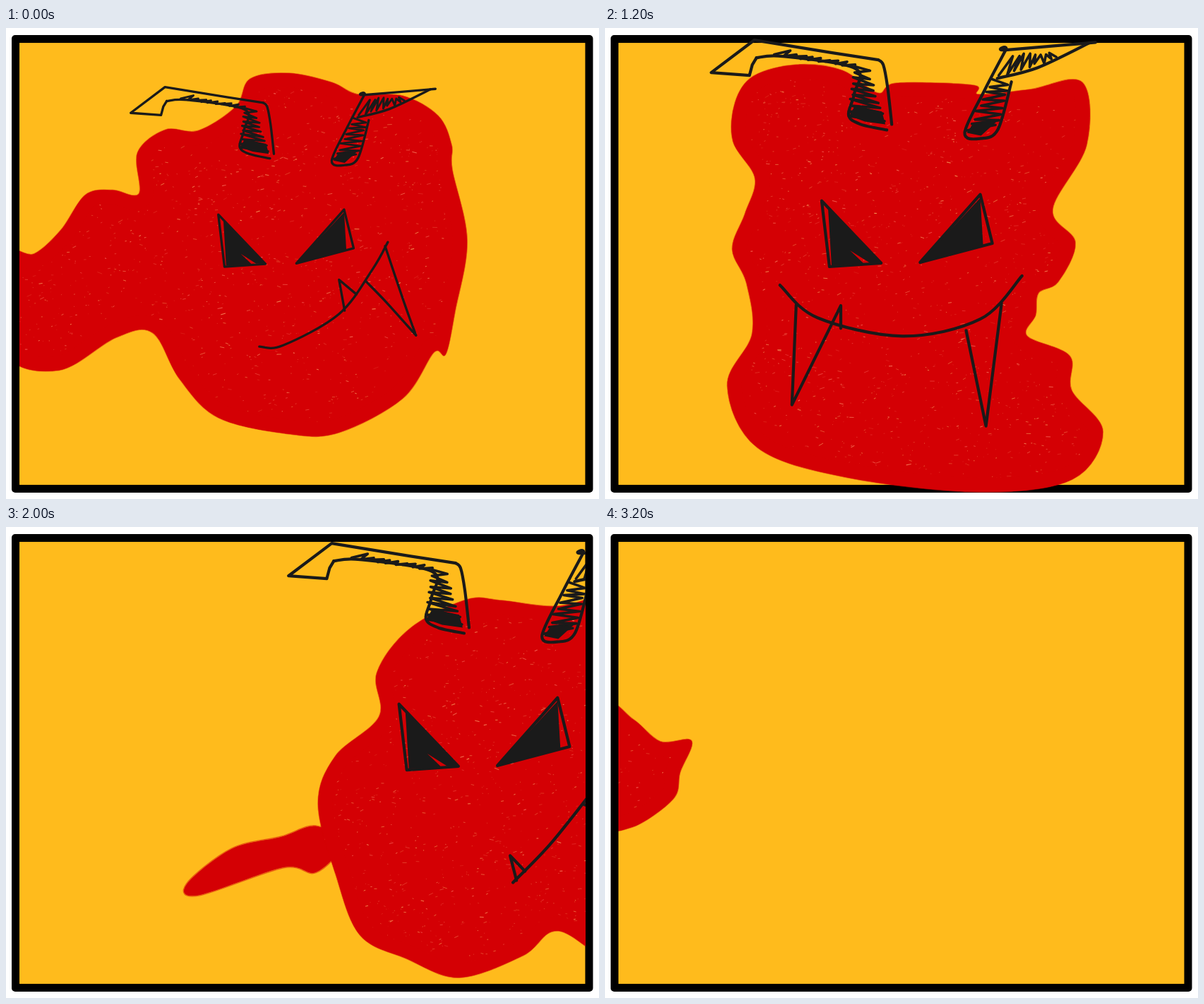
Write an HTML page with a canvas that moves like this. It is 840 px wide and 667 px high and loops after 3600 ms.

```html
<!DOCTYPE html>
<html lang="en">
<head>
<meta charset="utf-8">
<title>Red devil</title>
<style>
html, body { margin: 0; width: 100%; height: 100%; overflow: hidden; background: #fff; }
canvas { display: block; }
</style>
</head>
<body>
<canvas id="stage" width="840" height="667"></canvas>
<script>
const ctx = document.getElementById('stage').getContext('2d');
const RED = '#d40004', INK = '#1a1a1a', YELLOW = '#ffbb1c';
const HOLD = 400, ZOOM = 1.003;

const pts = s => s.split(' ').map(p => p.split(',').map(Number));
const lerp = (a, b, k) => a + (b - a) * k;

function random(seed) {
  return () => {
    seed = (seed * 1664525 + 1013904223) >>> 0;
    return seed / 4294967296;
  };
}

// Smooth path through a few key points
function curve(s, closed) {
  const p = pts(s), n = p.length, path = new Path2D();
  const at = i => closed ? p[(i + n) % n] : p[Math.max(0, Math.min(n - 1, i))];
  path.moveTo(...p[0]);
  for (let i = 0; i < (closed ? n : n - 1); i++) {
    const [a, b, c, d] = [at(i - 1), at(i), at(i + 1), at(i + 2)];
    path.bezierCurveTo(b[0] + (c[0] - a[0]) / 6, b[1] + (c[1] - a[1]) / 6,
      c[0] - (d[0] - b[0]) / 6, c[1] - (d[1] - b[1]) / 6, c[0], c[1]);
  }
  if (closed) path.closePath();
  return path;
}

function poly(s, closed) {
  const path = new Path2D();
  pts(s).forEach(p => path.lineTo(...p));
  if (closed) path.closePath();
  return path;
}

// Uneven scribble bouncing between two edges
function scribble(edgeA, edgeB, n) {
  const path = new Path2D(), a = pts(edgeA), b = pts(edgeB), rnd = random(n);
  for (let i = 0; i <= 2 * n; i++) {
    const [u, v] = i % 2 ? b : a, k = i / (2 * n);
    path.lineTo(lerp(u[0], v[0], k) + rnd() * 4 - 2, lerp(u[1], v[1], k) + rnd() * 4 - 2);
  }
  return path;
}

const leftHorn = [
  poly('345,87 280,77 170,59 109,105 163,109 167,94 173,84'),
  curve('345,87 352,94 358,125 364,178'),
  curve('173,84 210,82 312,99 311,135 303,165 320,178 357,186')
];
const rightHorn = [
  curve('643,63 643,63 525,73 525,73 495,130 467,190 490,198 514,185 533,118'),
  curve('513,113 570,98 643,63')
];
const eyes = [
  poly('265,286 276,379 349,374', true),
  poly('489,277 506,346 404,373', true)
];
const hatches = [
  scribble('199,81 308,95', '213,75 318,93', 9),
  scribble('313,98 304,166', '330,100 355,176', 9),
  scribble('516,111 598,84', '532,80 592,78', 8),
  scribble('506,116 471,188', '530,116 511,184', 8)
];
const fills = [
  poly('304,166 312,152 350,160 355,178 326,174', true),
  poly('470,190 478,178 512,174 490,194', true),
  poly('274,296 279,377 326,376 305,356 332,373 349,373', true),
  poly('489,282 493,349 404,373', true)
];

const smirk = [
  curve('338,521 380,519 480,463 540,383 567,335'),
  poly('490,457 480,402 511,428'),
  curve('562,342 595,440 617,501'),
  curve('617,501 565,443 528,405')
];
const grin = [
  curve('206,405 259,451 379,477 489,453 548,392'),
  poly('229,433 223,574 292,434 292,466'),
  poly('469,469 497,604 519,431')
];
const sneer = [
  curve('426,538 481,481 550,394'),
  poly('550,394 587,448 527,428'),
  poly('431,535 422,500 443,522')
];

const reaching = curve('0,323 40,319 78,285 112,236 150,229 188,234 186,176 225,144 272,145 325,111 345,72 400,64 460,77 497,94 560,96 610,124 629,165 630,200 651,300 634,400 621,460 604,458 560,523 470,571 400,573 300,550 245,495 207,430 155,437 75,483 0,458', true);
const lumpy = curve('53,388 80,360 105,300 135,264 180,254 190,215 187,155 220,122 297,113 350,88 405,66 470,92 488,126 560,126 620,135 636,190 640,262 683,318 687,400 677,470 695,545 685,605 600,640 475,619 335,640 262,608 249,520 200,480 113,462 63,468 82,415', true);
const tall = curve('180,312 198,262 212,212 181,160 184,105 210,68 270,52 335,60 385,92 412,78 520,81 528,94 600,87 674,77 680,165 632,256 664,303 640,358 612,374 608,405 596,435 656,463 659,512 703,570 660,637 530,655 340,634 215,592 173,505 208,432 200,360', true);
const leaving = curve('397,262 394,200 440,138 520,97 570,98 650,106 730,86 760,102 840,95 840,550 818,558 735,608 650,564 600,599 510,630 435,603 370,570 336,485 311,385 335,318', true);
const back = curve('840,81 760,93 688,109 617,193 632,240 671,292 632,333 572,393 586,440 630,468 634,530 700,583 718,603 790,611 840,588', true);
const drop = curve('308,476 345,447 386,437 415,428 436,443 415,466 388,462 318,485', true);
const nose = curve('0,255 40,272 78,303 122,302 106,346 96,384 37,424 0,410', true);

const place = (x = 0, y = 0, scale = 1) => ({ x, y, scale });
const blob = (shape, ...at) => ({ shape, ...place(...at) });
const face = (mouth, ...at) => ({ mouth, ...place(...at) });

const poses = [
  { blobs: [blob(reaching)], face: face(smirk, 89.7, 36.6, 0.793) },
  { blobs: [blob(lumpy)], face: face(smirk) },
  { blobs: [blob(lumpy, 76, 5, 0.93)], face: face(smirk, 18, -43) },
  { blobs: [blob(tall)], face: face(grin, 41, -42) },
  { blobs: [blob(leaving)], face: face(sneer, 159.5, -33) },
  { blobs: [blob(drop, -268, -305, 1.7), blob(leaving, 130, 6)], face: face(sneer, 290, -36) },
  { blobs: [blob(back), blob(drop)] },
  { blobs: [blob(back, 278, 94, 0.65)] },
  { blobs: [blob(nose)] }
];

function drawStage() {
  ctx.fillStyle = '#fff';
  ctx.fillRect(0, 0, 840, 667);
  ctx.fillStyle = '#000';
  ctx.beginPath();
  ctx.roundRect(8, 10, 821, 646, 5);
  ctx.fill();
  ctx.fillStyle = YELLOW;
  ctx.fillRect(19, 21, 799, 624);
}

function within({ x, y, scale }, paint) {
  ctx.save();
  ctx.translate(x, y);
  ctx.scale(scale, scale);
  paint();
  ctx.restore();
}

// Chalky specks, kept clear of the rim
function drawBlob(shape, rnd) {
  ctx.fillStyle = RED;
  ctx.fill(shape);
  ctx.strokeStyle = 'rgba(212,0,4,.5)';
  ctx.lineWidth = 2;
  ctx.stroke(shape);
  ctx.clip(shape);
  for (let i = 0; i < 2600; i++) {
    const x = rnd() * 840, y = 50 + rnd() * 610, len = 0.5 + rnd() * rnd() * 7;
    ctx.strokeStyle = `rgba(255,${lerp(120, 200, rnd()) | 0},110,${lerp(0.2, 0.75, rnd())})`;
    ctx.lineWidth = lerp(0.5, 1.2, rnd());
    ctx.beginPath();
    ctx.moveTo(x, y);
    ctx.lineTo(x + len, y + (rnd() - 0.6) * len);
    ctx.stroke();
  }
  ctx.strokeStyle = RED;
  ctx.lineWidth = 40;
  ctx.stroke(shape);
}

function drawFace(mouth) {
  ctx.strokeStyle = ctx.fillStyle = INK;
  ctx.lineCap = ctx.lineJoin = 'round';
  ctx.lineWidth = 4.2;
  [...leftHorn, ...rightHorn, ...eyes, ...mouth].forEach(p => ctx.stroke(p));
  ctx.lineWidth = 3.6;
  hatches.forEach(p => ctx.stroke(p));
  fills.forEach(p => ctx.fill(p));
}

function draw(index) {
  const { blobs, face } = poses[index], rnd = random(17 + index * 31);
  ctx.save();
  drawStage();
  ctx.scale(ZOOM, ZOOM);
  drawStage();
  ctx.beginPath();
  ctx.rect(19, 0, 799.5, 667);
  ctx.clip();
  blobs.forEach(b => within(b, () => drawBlob(b.shape, rnd)));
  if (face) within(face, () => drawFace(face.mouth));
  ctx.restore();
}

const start = performance.now();
let shown = -1;
function tick() {
  const index = Math.floor((performance.now() - start) / HOLD) % poses.length;
  if (index !== shown) draw(shown = index);
  requestAnimationFrame(tick);
}
tick();
</script>
</body>
</html>
```
